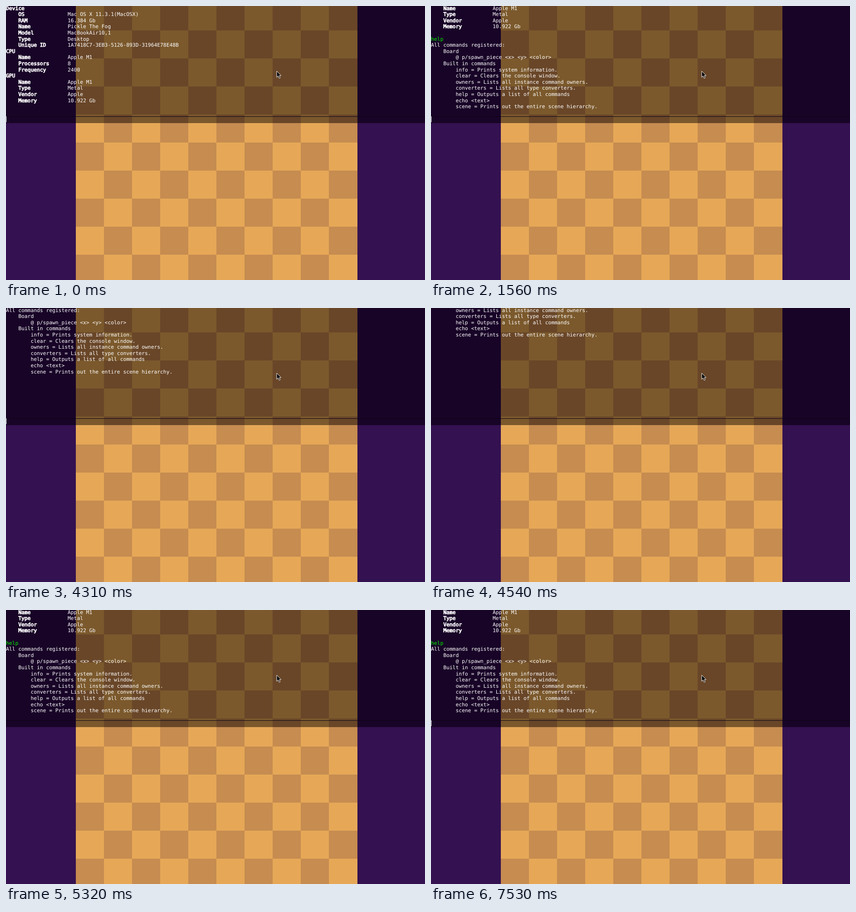
Write an HTML page that moves like this. It is 924 px wide and 606 px high and loops after 8 s.

```html
<!DOCTYPE html>
<html lang="en">
<head>
<meta charset="utf-8">
<title>Developer console</title>
<style>
  html, body { margin: 0; width: 100%; height: 100%; overflow: hidden; background: #341150; }
  svg { display: block; width: 100vw; height: 100vh; }
  text {
    font: 11.3px "DejaVu Sans Mono", monospace;
    fill: #fff;
    white-space: pre;
    text-rendering: geometricPrecision;
  }
  .key { stroke: #fff; stroke-width: .9px; }
  .echo { fill: #00f000; }
  .hint { fill: #fff; opacity: .62; }
</style>
</head>
<body>
<svg id="stage" viewBox="0 0 924 606"></svg>
<script>
const LOOP = 8000, LINE = 13.6, CHAR = 6.8, BASE = 8.6;
const CELL = 62.1, LEFT = 153.5, TOP = -8.5;
const SPLIT = 259, BAR = 244;
const stage = document.getElementById('stage');

function add(parent, tag, attrs, text) {
  const el = document.createElementNS('http://www.w3.org/2000/svg', tag);
  for (const k in attrs) el.setAttribute(k, attrs[k]);
  if (text !== undefined) el.textContent = text;
  return parent.appendChild(el);
}
const rect = (parent, x, y, width, height, fill) =>
  add(parent, 'rect', { x, y, width, height, fill });

// Checkerboard slice between y0 and y1 on a flat backdrop.
function board(y0, y1, back, light, dark) {
  rect(stage, 0, y0, 924, y1 - y0, back);
  for (let r = 0; r < 10; r++) {
    const a = Math.max(y0, TOP + r * CELL), b = Math.min(y1, TOP + (r + 1) * CELL);
    if (b <= a) continue;
    for (let c = 0; c < 10; c++) {
      const x = Math.round(LEFT + c * CELL), x2 = Math.round(LEFT + (c + 1) * CELL);
      const top = Math.round(a), end = Math.round(b);
      rect(stage, x, top, x2 - x, end - top, (r + c) % 2 ? dark : light);
    }
  }
}
board(0, SPLIT, '#180427', '#7b592c', '#694628');
board(SPLIT, 606, '#341150', '#e6a857', '#c68c50');

// Each row: indent in characters, text, optional value for a bold key.
const info = [
  [0, 'Device', ''],
  [4, 'OS', 'Mac OS X 11.3.1(MacOSX)'],
  [4, 'RAM', '16.384 Gb'],
  [4, 'Name', 'Pickle The Fog'],
  [4, 'Model', 'MacBookAir10,1'],
  [4, 'Type', 'Desktop'],
  [4, 'Unique ID', '1A7418C7-3EB3-5126-893D-31964E78E48B'],
  [0, 'CPU', ''],
  [4, 'Name', 'Apple M1'],
  [4, 'Processors', '8'],
  [4, 'Frequency', '2400'],
  [0, 'GPU', ''],
  [4, 'Name', 'Apple M1'],
  [4, 'Type', 'Metal'],
  [4, 'Vendor', 'Apple'],
  [4, 'Memory', '10.922 Gb'],
  [0, '']
];
const help = [
  [0, 'help'],
  [0, 'All commands registered:'],
  [4, 'Board'],
  [8, '@ p/spawn_piece <x> <y> <color>'],
  [4, 'Built in commands'],
  [8, 'info = Prints system information.'],
  [8, 'clear = Clears the console window.'],
  [8, 'owners = Lists all instance command owners.'],
  [8, 'converters = Lists all type converters.'],
  [8, 'help = Outputs a list of all commands'],
  [8, 'echo <text>'],
  [8, 'scene = Prints out the entire scene hierarchy.']
];

const log = add(stage, 'g', {});
const rows = [...info, ...help].map(([indent, label, value], i) => {
  const g = add(log, 'g', {});
  const y = BASE + i * LINE;
  const cls = value !== undefined ? 'key' : i === info.length ? 'echo' : '';
  add(g, 'text', { x: indent * CHAR, y, class: cls }, label);
  if (value) add(g, 'text', { x: 20 * CHAR, y }, value);
  return g;
});

rect(stage, 0, BAR, 924, 1, '#0c0213');
const hint = add(stage, 'g', {});
rect(hint, 0, SPLIT, 924, 16, '#1a0429').setAttribute('fill-opacity', .3);
add(hint, 'text', { x: 0, y: 270, class: 'hint' }, 'help = Outputs a list of all commands');
const input = add(stage, 'text', { x: 0, y: 254.6 });
const caret = rect(stage, 0, BAR, 1, 13, '#fff');
add(stage, 'path', {
  d: 'M597 144v13.6l3.1-2.9 2.2 5.2 2.4-1-2.2-5h4.2z',
  fill: '#000', stroke: '#fff', 'stroke-width': 1, 'stroke-linejoin': 'round'
});

// Value of the last [time, value] step reached.
const at = (steps, t) => steps.reduce((v, [time, next]) => t >= time ? next : v, steps[0][1]);

const typed = [[0, ''], [1020, 'h'], [1080, 'he'], [1200, 'help'], [1560, '']];
const blink = [[0, 1], [420, 0], [1020, 1], [2570, 0], [3530, 1], [4540, 0], [5550, 1], [6510, 0], [7530, 1]];
const scroll = [[0, 0], [1560, 12], [4310, 18], [4370, 24], [5080, 23], [5140, 21], [5200, 16], [5320, 12]];

const show = (el, on) => el.setAttribute('visibility', on ? 'visible' : 'hidden');

function draw(t) {
  const text = at(typed, t), top = at(scroll, t);
  const count = t < 1560 ? info.length : rows.length;
  log.setAttribute('transform', `translate(0 ${-top * LINE})`);
  rows.forEach((row, i) => show(row, i >= top && i < count));
  input.textContent = text;
  show(hint, text);
  caret.setAttribute('x', Math.floor(text.length * CHAR));
  show(caret, at(blink, t));
}

const start = performance.now();
function tick() {
  draw((performance.now() - start) % LOOP);
  requestAnimationFrame(tick);
}
draw(0);
requestAnimationFrame(tick);
</script>
</body>
</html>
```
